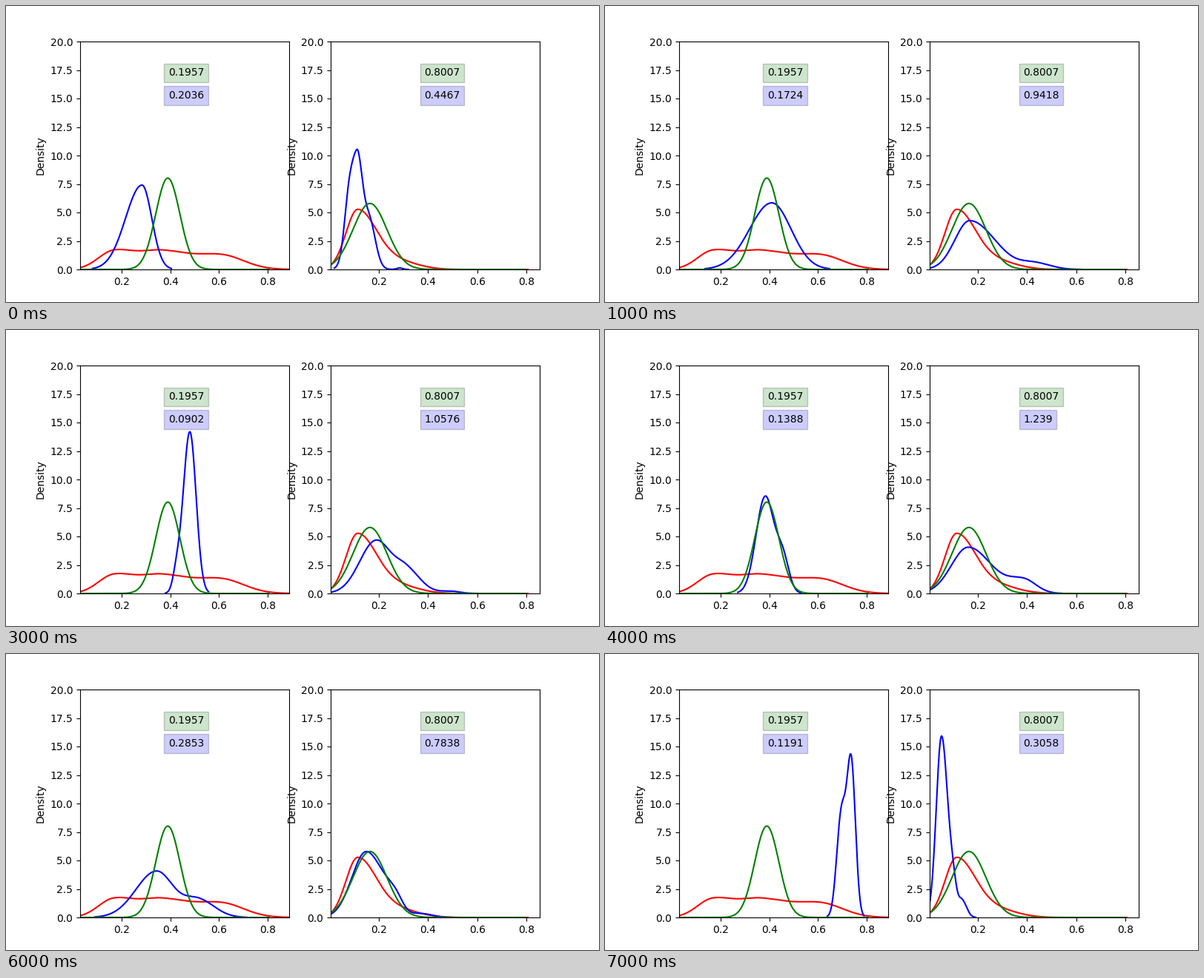
Write a matplotlib script that moves like this. It is 800 by 400 pixels and loops after 8000 ms.

```python
import numpy as np
import matplotlib.pyplot as plt
from matplotlib.animation import FuncAnimation
from matplotlib.transforms import IdentityTransform

BASE = 44  # height of the density axis zero, in pixels
STEP_MS = 1000


def bump(x, center, height, left, right):
    """Bell with its own width on each side."""
    width = np.where(x < center, left, right)
    return height * np.exp(-((x - center) / width) ** 2 / 2)


def density(*bumps, span=None):
    """Sum of bumps (center, height, left width, right width) in pixels."""
    start = min(c - 3 * left for c, _, left, _ in bumps)
    end = max(c + 3 * right for c, _, _, right in bumps)
    x = np.linspace(*(span or (start, end)), 600)
    return x, BASE + sum(bump(x, *b) for b in bumps)


class Panel:
    def __init__(self, ax, xlim, text_x, fixed, red, green):
        ax.set(xlim=xlim, ylim=(0, 20), ylabel="Density",
               xticks=[0.2, 0.4, 0.6, 0.8])
        self.ax = ax
        self.steps = []
        self.draw(red, "r")
        self.line = self.draw(([], []), "b")
        self.draw(green, "g")
        self.label(text_x, 17, fixed, "green")
        self.score = self.label(text_x, 15, "", "blue")

    def draw(self, curve, color):
        line, = self.ax.plot(*curve, color=color, lw=1.5,
                             transform=IdentityTransform())
        return line

    def label(self, x, y, value, color):
        return self.ax.text(x, y, value,
                            bbox={"facecolor": color, "alpha": 0.2})

    def add(self, value, *bumps):
        self.steps.append((value, density(*bumps)))

    def show(self, i):
        value, curve = self.steps[i]
        self.line.set_data(*curve)
        self.score.set_text(value)


fig, (ax_left, ax_right) = plt.subplots(1, 2, figsize=(8, 4), dpi=100)

left = Panel(
    ax_left, (0.0285, 0.8875), 0.391, "0.1957",
    red=density((145, 24, 21, 27), (210, 24.5, 30, 38), (292, 18, 32, 30)),
    green=density((218.3, 123.5, 16.3, 16.3), span=(100, 355)))
right = Panel(
    ax_right, (0.0045, 0.8542), 0.3848, "0.8007",
    red=density((474.5, 81, 16, 26), (533, 9, 22, 26), span=(438, 704)),
    green=density((491, 89.2, 22.9, 22.9), span=(438, 700)))

left.add("0.2036", (183.5, 114, 22.3, 13.2))
right.add("0.4467", (461, 36, 5.5, 5.5), (473, 146, 10, 7),
          (489.5, 68, 9, 8.5), (531, 2, 4, 4))

left.add("0.1724", (225, 90, 30, 26))
right.add("0.9418", (492, 66, 20, 34), (580, 8, 18, 21))

left.add("0.365", (160, 41, 20, 24), (204, 50, 21, 23.5))
right.add("1.3065", (505, 50, 29, 22), (550, 36, 18, 21), (600, 8, 14, 15))

left.add("0.0902", (230, 22, 5, 5), (248, 218.5, 9, 8.4))
right.add("1.0576", (499, 71, 22, 20), (540, 31, 16, 19), (600, 3, 15, 12))

left.add("0.1388", (216, 130, 12.3, 11.5), (239.5, 48, 9, 8.5))
right.add("1.239", (490, 62.5, 22.8, 31), (565, 17.5, 20, 17))

left.add("0.2106", (224, 75, 26, 28))
right.add("0.6412", (482, 100, 14, 24), (550, 8, 15, 19))

left.add("0.2853", (203, 62.5, 27.7, 22.5), (259, 24, 19, 22))
right.add("0.7838", (486, 89, 19.5, 23), (525, 19, 12, 10),
          (560, 5, 12, 15))

left.add("0.1191", (318.5, 132, 6.2, 5.7), (332, 212, 6, 5.8))
right.add("0.3058", (454, 245, 7.1, 8.4), (470, 34, 5, 5),
          (482, 22, 4.5, 6))


def update(i):
    left.show(i)
    right.show(i)


anim = FuncAnimation(fig, update, frames=len(left.steps), interval=STEP_MS,
                     repeat=True, repeat_delay=0)
plt.show()
```
